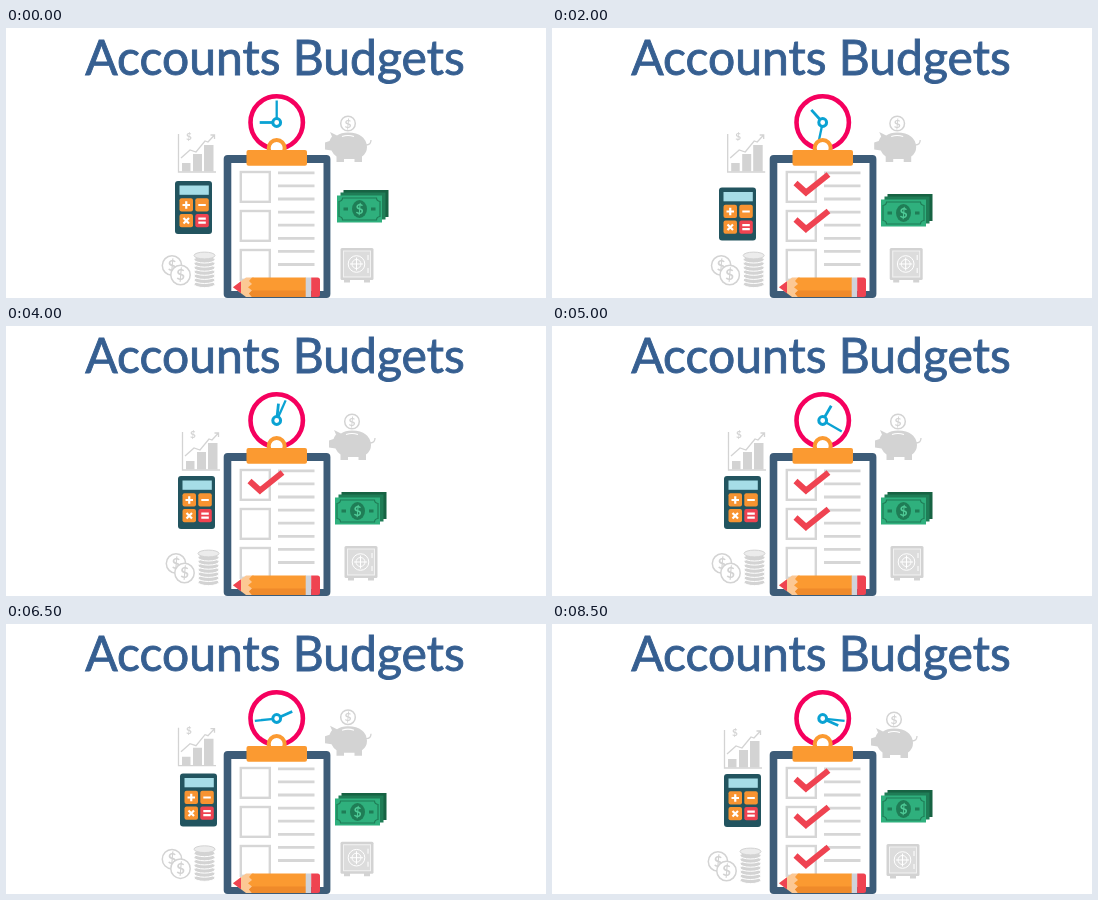
These frames come from a looping animation (540x270 px, 9000 ms). An HTML page:

```html
<!DOCTYPE html>
<html lang="en">
<head>
<meta charset="utf-8">
<title>Accounts Budgets</title>
<style>
  html, body { margin: 0; width: 100%; height: 100%; overflow: hidden; background: #fff; }
  svg { display: block; width: 100%; height: 100%; }
  text { font-family: Lato, sans-serif; text-anchor: middle; }
  .line { fill: none; stroke: #d3d3d3; stroke-width: 1.3; }
  .gray { fill: #d3d3d3; }
</style>
</head>
<body>
<svg viewBox="0 0 540 270">
  <defs>
    <path id="tick" d="M243.500 155L254 164.500L276.500 146.500" fill="none" stroke="#ef4351" stroke-width="6"/>
    <g id="coin">
      <circle r="9.700" fill="#fff" stroke="#d3d3d3" stroke-width="1.500"/>
      <text y="5.200" font-size="15" font-weight="700" class="gray">$</text>
    </g>
    <rect id="note" width="45" height="27"/>
    <rect id="button" width="13.500" height="13.300" rx="2"/>
  </defs>

  <text x="269" y="47" font-size="48" fill="#365f91" stroke="#365f91" stroke-width=".9">Accounts Budgets</text>

  <g class="drift">
    <path class="line" d="M172.500 106V144H210M175 130L184 122L190 124L199 113L202 114L208 107.500M204.500 107H208.500V111"/>
    <path class="gray" d="M176 135h8.500v8.500h-8.500zM187 126h9v17.500h-9zM198 117h9.500v26.500h-9.500z"/>
    <text x="183" y="112" font-size="10" font-weight="700" class="gray">$</text>
  </g>

  <g class="drift">
    <use href="#coin" x="166" y="237.500"/>
    <use href="#coin" x="174.500" y="247"/>
    <g id="stack"></g>
  </g>

  <g class="drift">
    <circle cx="342" cy="95.500" r="7.300" fill="#fff" stroke="#d3d3d3" stroke-width="1.500"/>
    <text x="342" y="99.800" font-size="12" font-weight="700" class="gray">$</text>
    <path class="gray" d="M324 104l7 3.500Q335 104.500 342 104.500Q360 105 361 119Q361 125 356 128.500V134H348.500V131H338V134H330.500V128.500Q327 126 325.500 122.500L319 121.500V114.500L323.500 113Q324.500 110 326 108.500Z"/>
    <path class="line" d="M360 117Q365 117 365 112"/>
    <path d="M336 108.500Q342 106.500 348 108.500" fill="none" stroke="#fff" stroke-width="1.200"/>
  </g>

  <g class="drift">
    <path class="gray" d="M338 251h6v3.500h-6zM358 251h6v3.500h-6z"/>
    <rect x="334.500" y="220" width="33" height="32" rx="1.500" class="gray"/>
    <rect x="337.500" y="223" width="27" height="26" fill="#dcdcdc" stroke="#f2f2f2"/>
    <g fill="none" stroke="#fff">
      <circle cx="350.500" cy="236" r="8.300"/>
      <circle cx="350.500" cy="236" r="4.500"/>
      <path d="M350.500 229.500v13M344 236h13M362 227v5M362 240v5"/>
    </g>
  </g>

  <g id="calculator">
    <rect x="169" y="153" width="37" height="53" rx="3" fill="#22545f"/>
    <rect x="173.500" y="157.500" width="29.300" height="9.300" fill="#a6dde7"/>
    <g fill="#f79331">
      <use href="#button" x="173.500" y="170.300"/>
      <use href="#button" x="189.300" y="170.300"/>
      <use href="#button" x="173.500" y="186"/>
      <use href="#button" x="189.300" y="186" fill="#ef4351"/>
    </g>
    <path d="M176.500 177h7.500M180.250 173.250v7.500M192.300 177h7.500M177.500 190l5.500 5.500M183 190l-5.500 5.500M192.300 190.700h7.500M192.300 194.700h7.500" stroke="#fff" stroke-width="2.200"/>
  </g>

  <g id="money">
    <use href="#note" x="337.500" y="162" fill="#176343"/>
    <use href="#note" x="334.500" y="164.500" fill="#1f7d56"/>
    <use href="#note" x="331" y="167.500" fill="#2fb07d"/>
    <path d="M336.500 170h34q0 3 3.500 3.500v15q-3.500 .5-3.500 3.500h-34q0-3-3.500-3.500v-15q3.500-.5 3.500-3.500z" fill="none" stroke="#1f7d56" stroke-width="1.200"/>
    <ellipse cx="353.500" cy="181" rx="7.500" ry="9" fill="#1f7d56"/>
    <text x="353.500" y="186" font-size="14" font-weight="700" fill="#4fcb97">$</text>
    <path d="M337.500 181h4.500M365 181h4.500" stroke="#1f7d56" stroke-width="3"/>
  </g>

  <circle cx="270.700" cy="94.500" r="26.200" fill="#fff" stroke="#f5005e" stroke-width="4.600"/>
  <g stroke="#0aa2d3" fill="none">
    <path id="minute" d="M270.700 91.500V72.500" stroke-width="2.300"/>
    <path id="hour" d="M270.700 91.500V77.500" stroke-width="2.800"/>
    <circle cx="270.700" cy="94.500" r="3.900" fill="#fff" stroke-width="3"/>
  </g>

  <rect x="217.700" y="127" width="106.700" height="143" rx="4" fill="#3d5c78"/>
  <rect x="225.300" y="135" width="92.200" height="128" fill="#fff"/>
  <g id="rows" fill="none" stroke="#d6d6d6"></g>
  <g id="ticks">
    <use href="#tick"/>
    <use href="#tick" y="36.500"/>
    <use href="#tick" y="76.500"/>
  </g>
  <circle cx="270.700" cy="120" r="8" fill="#fff" stroke="#fb9a31" stroke-width="4"/>
  <rect x="240.500" y="122" width="60.500" height="15.700" rx="2" fill="#fb9a31"/>

  <g id="pencil">
    <path d="M248 249.500H240L227 259.200L240 269H248Z" fill="#fcc894"/>
    <path d="M235 253.200L227 259.200L235 265.200Z" fill="#ef4351"/>
    <path d="M246 249.500H300V269H246L243 265.500L246 262.500L242 259.200L246 256L243 253Z" fill="#fb9a31"/>
    <path d="M243 265.500L246 262.500H300V269H246Z" fill="#ef8a2a"/>
    <rect x="299.700" y="249.500" width="5.500" height="19.500" fill="#cfd3da"/>
    <path d="M305.200 249.500H311.500Q314 249.500 314 252V266.500Q314 269 311.500 269H305.200Z" fill="#ef4351"/>
  </g>
</svg>
<script>
const NS = 'http://www.w3.org/2000/svg';
const $ = id => document.getElementById(id);
const add = (parent, name, attrs) => {
  const node = document.createElementNS(NS, name);
  for (const key in attrs) node.setAttribute(key, attrs[key]);
  parent.append(node);
};

for (let i = 0; i < 3; i++)
  add($('rows'), 'rect', { x: 234.8, y: 144 + 39 * i, width: 29, height: 29.8, 'stroke-width': 2.4 });
for (let i = 0; i < 8; i++)
  add($('rows'), 'path', { d: `M272 ${144.8 + 13.1 * i}H308.5`, 'stroke-width': 2.8 });
for (let i = 7; i >= 0; i--)
  add($('stack'), 'ellipse', { cx: 198.5, cy: 227.5 + 4.1 * i, rx: 10.5, ry: 3.4, fill: i ? '#d3d3d3' : '#ececec', stroke: i ? '#fff' : '#d3d3d3' });

const STEP = 500, LOOP = 9000;

// Resting poses as [first step, x, y]; the shake pose replaces them on odd steps
const drift = { shake: [0, -2.3], rest: [[0, 0, 0], [1, 4, 0], [2, 0, 0], [4, 3.2, 0], [8, 4, 0], [16, 0, 0]] };
const calculator = { shake: [5, -3.5], rest: [[0, 0, 0], [4, -2, 6.5], [5, 3, -3]] };
const money = { shake: [-2, 7], rest: [[0, 0, 0], [2, -2, 4]] };
const tickCounts = [3, 0, 1, 1, 2, 3];

const poseAt = ({ shake, rest }, step) =>
  step % 2 && step > 4 && step < 16 ? shake : rest.findLast(([first]) => step >= first).slice(1);
const move = (node, track, step) =>
  node.setAttribute('transform', `translate(${poseAt(track, step).join(' ')})`);
const turn = (id, angle) => $(id).setAttribute('transform', `rotate(${angle} 270.7 94.5)`);
const drifters = document.querySelectorAll('.drift');
const marks = [...$('ticks').children];

function draw(now) {
  const step = Math.floor(now % LOOP / STEP);
  const seconds = step * STEP / 1000;
  drifters.forEach(node => move(node, drift, step));
  move($('calculator'), calculator, step);
  move($('money'), money, step);
  turn('minute', 96 * seconds);
  turn('hour', 270 + 24 * seconds);
  const count = step ? tickCounts[step % tickCounts.length] : 0;
  marks.forEach((mark, n) => mark.setAttribute('visibility', n < count ? 'visible' : 'hidden'));
}

let start;
function tick(now) {
  start ??= now;
  draw(now - start);
  requestAnimationFrame(tick);
}
draw(0);
requestAnimationFrame(tick);
</script>
</body>
</html>
```
